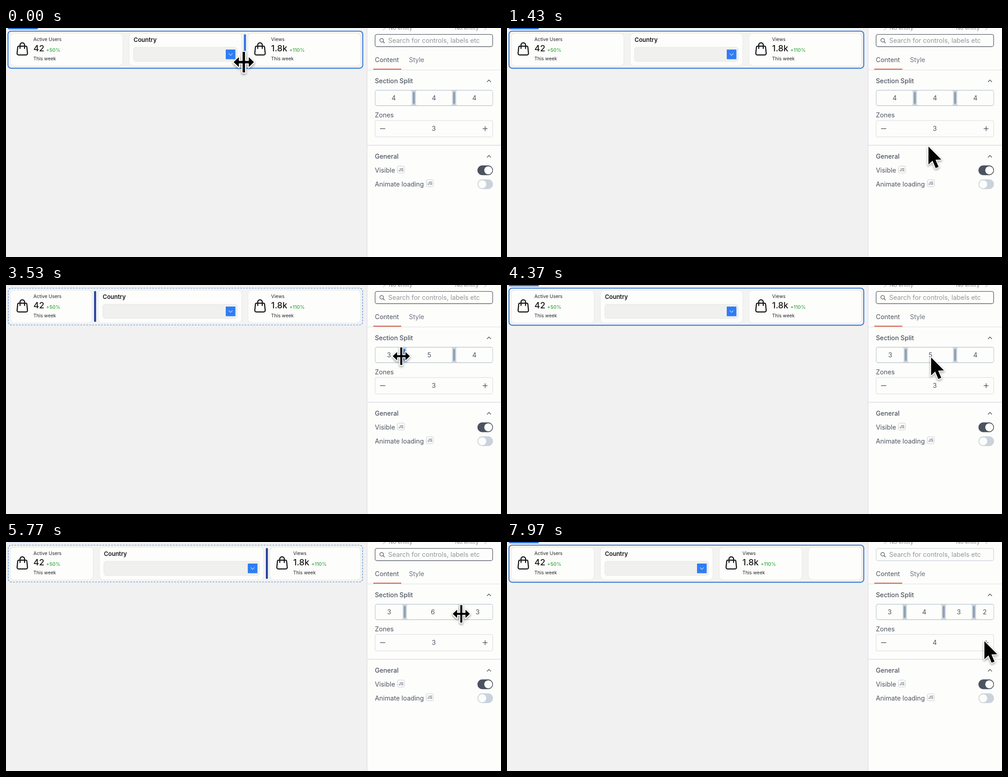
An HTML page with a canvas for the animation above (8000 ms loop, 1097 by 510 pixels).

```html
<!DOCTYPE html>
<html lang="en">
<head>
<meta charset="utf-8">
<title>Section split</title>
<style>
html, body { margin: 0; width: 100%; height: 100%; overflow: hidden; background: #f1f1f1; }
canvas { display: block; width: 1097px; height: 510px; }
</style>
</head>
<body>
<canvas id="stage"></canvas>
<script>
const W = 1097, H = 510, LOOP = 8000;
const canvas = document.getElementById('stage');
const ctx = canvas.getContext('2d');
const dpr = window.devicePixelRatio || 1;
canvas.width = W * dpr;
canvas.height = H * dpr;

const INK = '#4c5462', BLUE = '#2f7df4', NAVY = '#233f9f', PAPER = '#fdfdfb';

// Pointer stops: time, x, y
const PATH = [
  [0, 527, 76], [300, 527, 76], [1400, 933, 262], [1500, 933, 262],
  [2100, 904, 157.5], [2500, 904, 157.5], [3400, 876, 158.5], [3900, 876, 158.5],
  [4800, 993.5, 160], [5250, 993.5, 160], [6050, 1015, 160], [6250, 1015, 160],
  [6600, 988, 205], [6750, 988, 205], [7350, 1057, 219], [LOOP, 1057, 219]
];
const PRESS = [[2250, 3750], [5120, 6150]];
const ADD_AT = 7530;

const ease = p => p * p * (3 - 2 * p);
const ramp = (t, a, b) => ease(Math.min(1, Math.max(0, (t - a) / (b - a))));

function pointerAt(t) {
  let i = 1;
  while (i < PATH.length - 1 && t > PATH[i][0]) i++;
  const [t0, x0, y0] = PATH[i - 1], [t1, x1, y1] = PATH[i];
  const p = ramp(t, t0, t1);
  return { x: x0 + (x1 - x0) * p, y: y0 + (y1 - y0) * p };
}

// Column edges of the zones, out of 12
function edgesAt(t) {
  if (t >= ADD_AT) return [0, 3, 7, 10, 12];
  const first = t < PRESS[0][1] ? 4 - 1.04 * ramp(t, 2500, 3400) : 3;
  const second = t < PRESS[1][1] ? 8 + 1.03 * ramp(t, 5250, 6050) : 9;
  return [0, first, second, 12];
}

function box(x, y, w, h, r, fill, stroke, line = 1) {
  ctx.beginPath();
  ctx.roundRect(x, y, w, h, r);
  if (fill) { ctx.fillStyle = fill; ctx.fill(); }
  if (stroke) { ctx.strokeStyle = stroke; ctx.lineWidth = line; ctx.stroke(); }
}

function line(points, color, width = 1) {
  ctx.beginPath();
  points.forEach(([x, y], i) => i ? ctx.lineTo(x, y) : ctx.moveTo(x, y));
  ctx.strokeStyle = color;
  ctx.lineWidth = width;
  ctx.stroke();
}

function text(str, x, y, size, color = INK, weight = 400, align = 'left') {
  ctx.font = `${weight} ${size}px Inter, Roboto, sans-serif`;
  ctx.textAlign = align;
  ctx.fillStyle = color;
  ctx.fillText(str, x, y);
}

function bag(x, y) {
  ctx.lineJoin = ctx.lineCap = 'round';
  ctx.beginPath();
  ctx.moveTo(x + 5, y + 8.5);
  ctx.lineTo(x + 20, y + 8.5);
  ctx.quadraticCurveTo(x + 22.3, y + 8.5, x + 22.6, y + 10.7);
  ctx.lineTo(x + 24, y + 24);
  ctx.quadraticCurveTo(x + 24.2, y + 28, x + 20.5, y + 28);
  ctx.lineTo(x + 4.5, y + 28);
  ctx.quadraticCurveTo(x + 0.8, y + 28, x + 1, y + 24);
  ctx.lineTo(x + 2.4, y + 10.7);
  ctx.quadraticCurveTo(x + 2.7, y + 8.5, x + 5, y + 8.5);
  ctx.moveTo(x + 7.5, y + 13.5);
  ctx.lineTo(x + 7.5, y + 6);
  ctx.arc(x + 12.5, y + 6, 5, Math.PI, 0);
  ctx.lineTo(x + 17.5, y + 13.5);
  ctx.strokeStyle = '#17171c';
  ctx.lineWidth = 2.4;
  ctx.stroke();
  ctx.lineJoin = 'miter';
  ctx.lineCap = 'butt';
}

function stat(x, title, value, change, changeX) {
  bag(x + 14.2, 32);
  text(title, x + 51.4, 29, 10.4, '#25252b');
  text(value, x + 51.4, 52, 19, '#17171c', 500);
  text(change, x + changeX, 53, 10.8, '#31a43c', 500);
  text('This week', x + 51.4, 72, 10.4, '#25252b');
}

function select(x, right) {
  text('Country', x + 10, 31, 13, '#17171c', 600);
  box(x + 10, 43, right - x - 20, 31.5, 5, '#f0f0ee', '#e6e6e4');
  const bx = right - 35.4;
  box(bx, 48, 21.4, 21.4, 1, BLUE);
  line([[bx + 6.4, 56.6], [bx + 10.7, 60.9], [bx + 15, 56.6]], '#cfe2ff', 1.1);
}

const edgeX = col => 2.6 + 65.85 * col;

function drawCanvas(edges, pressed, hover) {
  ctx.fillStyle = '#f1f1f1';
  ctx.fillRect(0, 0, 800, H);
  if (pressed) {
    ctx.fillStyle = '#dde8f5';
    ctx.fillRect(4, 0, 67, 2);
    ctx.setLineDash([4, 2.5]);
    box(5, 7, 785.3, 82, 7, '#f3f3f2', '#4585d6', 1.2);
    ctx.setLineDash([]);
  } else {
    box(4, -8, 67, 11, 3, '#357ae2');
    box(4.4, 7, 786.2, 82.6, 7, '#f3f3f2', '#3a7bd9', 2.2);
  }
  for (let i = 0; i < edges.length - 1; i++) {
    const x = edgeX(edges[i]) + 6.8, right = edgeX(edges[i + 1]) - 7;
    box(x, 11.5, right - x, 73, 9, PAPER, '#e7e7e6');
    if (i === 0) stat(x, 'Active Users', '42', '+50%', 79.6);
    if (i === 1) select(x, right);
    if (i === 2) stat(x, 'Views', '1.8k', '+110%', 91.8);
  }
  if (pressed) box(edgeX(edges[pressed]) - 2.3, 13.5, 4.4, 68.5, 1.5, NAVY);
  if (hover) box(edgeX(edges[2]) - 2.2, 14, 4.6, 68, 1.5, '#3474e6');
}

function splitLayout(edges) {
  const gap = 9, n = edges.length - 1;
  const unit = (259 - gap * (n - 1)) / 12;
  return edges.slice(0, n).map((edge, i) => {
    const left = 819 + edge * unit + gap * i;
    return { left, right: left + (edges[i + 1] - edge) * unit };
  });
}

function drawSplit(edges, segs, active) {
  box(818.3, 138.5, 260.2, 34.5, 4, '#c9d3dc', '#c5d0d9', 1.5);
  segs.forEach((s, i) => {
    box(s.left, 139.5, s.right - s.left, 32.5, 3, PAPER);
    const count = Math.round(edges[i + 1]) - Math.round(edges[i]);
    text(count, (s.left + s.right) / 2, 161, 14.5, INK, 400, 'center');
    if (i) box(s.left - 6.8, 142.5, 4.4, 26.5, 2, active === i ? '#3d76e0' : '#8f9fb2');
  });
}

function badge(x, y) {
  box(x + 0.5, y + 0.5, 15.5, 15.5, 3, PAPER, '#c3c9d1');
  text('JS', x + 8.3, y + 11.8, 9, '#6b7280', 600, 'center');
}

function toggle(y, on) {
  box(1044.8, y, 34.4, 21.8, 10.9, on ? '#4b5361' : '#cad2dc');
  ctx.beginPath();
  ctx.arc(on ? 1068.8 : 1055.4, y + 10.9, 9, 0, Math.PI * 2);
  ctx.fillStyle = PAPER;
  ctx.fill();
}

function chevron(y) {
  line([[1066, y + 2.2], [1070.3, y - 2.2], [1074.6, y + 2.2]], INK, 1.4);
}

function drawPanel(edges, segs, active, focused) {
  ctx.fillStyle = PAPER;
  ctx.fillRect(800, 0, W - 800, H);
  line([[800.2, 0], [800.2, H]], '#d6d4ea');

  line([[842, -1], [835.5, 4.5]], '#9a9a9a');
  line([[1066, -1], [1060, 4.5]], '#9a9a9a');
  text('No entity', 848, 3.5, 12.3, '#8d8d8d');
  text('No entity', 995, 3.5, 12.3, '#8d8d8d');

  box(818, 14.3, 260.5, 27.2, 4, PAPER, focused ? '#5a606a' : '#cdd4dc', 1.3);
  ctx.beginPath();
  ctx.arc(832.5, 27.3, 4, 0, Math.PI * 2);
  ctx.strokeStyle = INK;
  ctx.lineWidth = 1.3;
  ctx.stroke();
  line([[835.5, 30.3], [839, 33.8]], INK, 1.4);
  text('Search for controls, labels etc', 847, 33, 14.4, '#92979e');

  text('Content', 817.5, 76, 14.25, INK);
  text('Style', 893, 76, 14.25, '#6b7280');
  line([[801, 93.5], [W, 93.5]], '#dadde5');
  ctx.fillStyle = '#d5543c';
  ctx.fillRect(814, 90.7, 62, 2);

  text('Section Split', 817.5, 123, 14.1, INK, 500);
  chevron(118);
  drawSplit(edges, segs, active);

  text('Zones', 817.5, 198.5, 14.25);
  box(818, 206, 260.5, 36.5, 3, PAPER, '#d3d9e0');
  line([[829, 224.2], [840.5, 224.2]], INK, 1.4);
  line([[1056.5, 224.2], [1067, 224.2]], INK, 1.4);
  line([[1061.8, 219], [1061.8, 229.5]], INK, 1.4);
  text(edges.length - 1, 948, 229, 14.5, INK, 400, 'center');
  line([[801, 261.2], [W, 261.2]], '#d6d4ea', 1.3);

  text('General', 817.5, 290.5, 14.1, INK, 500);
  chevron(286);
  text('Visible', 817.5, 321.5, 14.25);
  badge(867, 307);
  toggle(306, true);
  text('Animate loading', 817.5, 352.5, 14.25);
  badge(931, 337.5);
  toggle(337, false);
}

function shape(points, outline) {
  ctx.beginPath();
  points.forEach(([x, y], i) => i ? ctx.lineTo(x, y) : ctx.moveTo(x, y));
  ctx.closePath();
  ctx.lineJoin = 'round';
  ctx.strokeStyle = '#fff';
  ctx.lineWidth = outline;
  ctx.shadowColor = 'rgba(0,0,0,.4)';
  ctx.shadowBlur = 5 * dpr;
  ctx.shadowOffsetY = 2.5 * dpr;
  ctx.stroke();
  ctx.shadowColor = 'transparent';
  ctx.fillStyle = '#000';
  ctx.fill();
  ctx.lineJoin = 'miter';
}

function drawPointer({ x, y }, resizing, scale) {
  ctx.save();
  ctx.translate(x, y);
  if (resizing) {
    ctx.scale(scale, scale);
    const quarter = [[2.1, -18], [2.1, -2.1], [8.6, -2.1], [8.6, -8.6], [17.6, 0]];
    const half = quarter.concat(quarter.slice(0, 4).reverse().map(([a, b]) => [a, -b]));
    shape(half.concat(half.slice().reverse().map(([a, b]) => [-a, b])), 3.6);
  } else {
    shape([[1, 2], [1, 42], [10, 33.5], [17, 50], [23.5, 47.2], [16.6, 31.5], [29.5, 31]], 3.6);
  }
  ctx.restore();
}

function frame(now) {
  const t = now % LOOP;
  const tip = pointerAt(t);
  const edges = edgesAt(t);
  const segs = splitLayout(edges);
  const pressed = PRESS.findIndex(([a, b]) => t >= a && t < b) + 1;
  const onBar = Math.abs(tip.x - edgeX(edges[2])) < 9 && tip.y < 88;
  const inSplit = tip.y > 138 && tip.y < 173;
  const over = segs.findIndex((s, i) => i && inSplit && Math.abs(tip.x - s.left + 4.5) < 9);

  ctx.setTransform(dpr, 0, 0, dpr, 0, 0);
  drawCanvas(edges, pressed, onBar);
  drawPanel(edges, segs, pressed || over, t < ADD_AT);
  drawPointer(tip, pressed || onBar || over > 0, onBar ? 1.28 : 1.08);
  requestAnimationFrame(frame);
}
requestAnimationFrame(frame);
</script>
</body>
</html>
```
